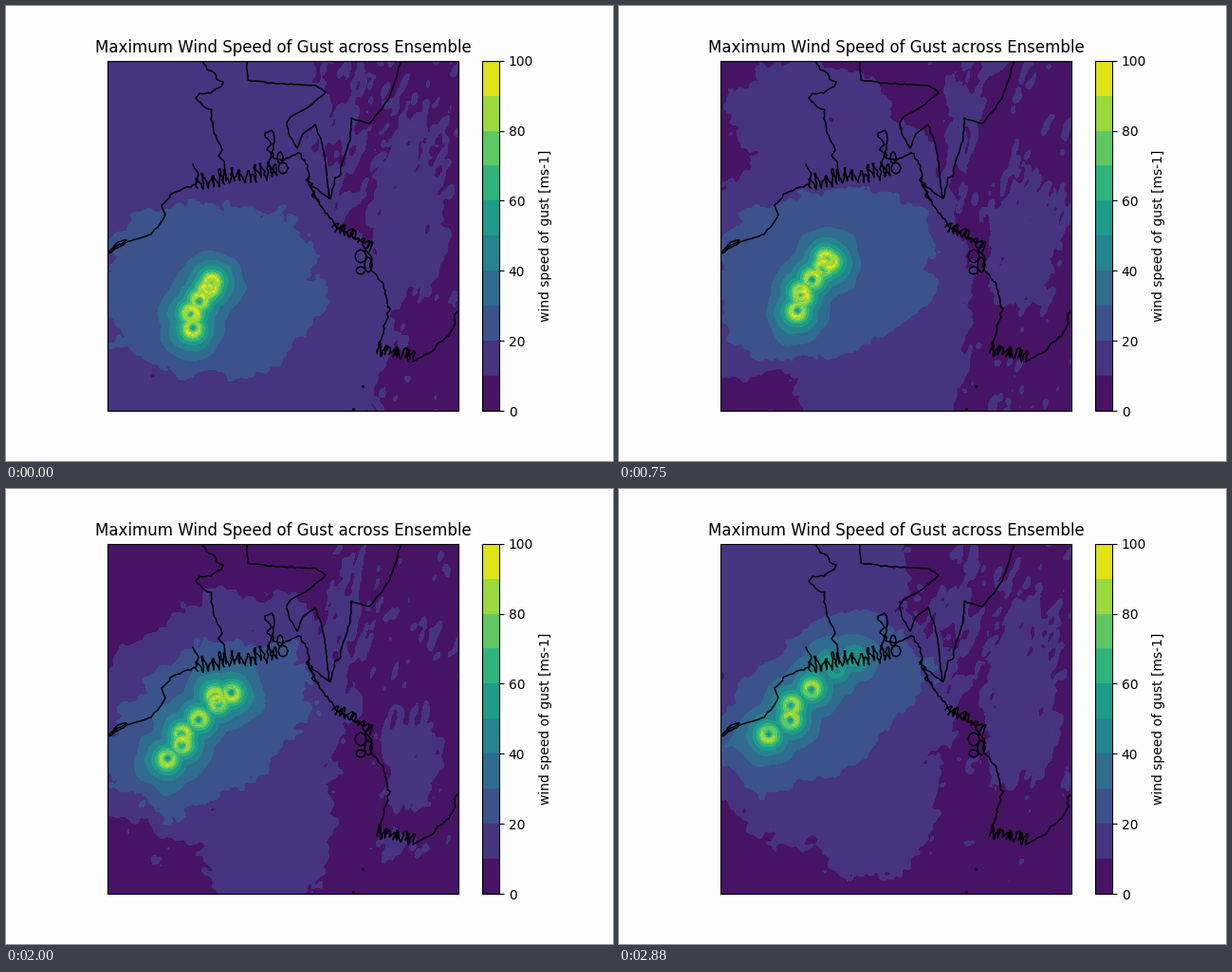
A matplotlib script for the animation above (3.01 s loop, 640 by 480 pixels).

```python
import numpy as np
import matplotlib.pyplot as plt
from matplotlib.animation import ArtistAnimation

STEPS = 24
LOOP_MS = 3010
LEFT, RIGHT, TOP, BOTTOM = 107.2, 476.8, 57.6, 427.2
N = 186

X, Y = np.meshgrid(np.linspace(LEFT, RIGHT, N), np.linspace(TOP, BOTTOM, N))
rng = np.random.default_rng(4)


def noise(sx, sy, tilt=0.0):
    """Smooth random field with unit spread; sizes in grid cells."""
    white = np.fft.fft2(rng.standard_normal(X.shape))
    kx, ky = np.meshgrid(np.fft.fftfreq(N), np.fft.fftfreq(N))
    u = kx * np.cos(tilt) + ky * np.sin(tilt)
    w = ky * np.cos(tilt) - kx * np.sin(tilt)
    field = np.fft.ifft2(white * np.exp(-20 * ((sx * u) ** 2 + (sy * w) ** 2))).real
    return field / field.std()


def shifting(*size):
    """Noise that changes smoothly with time."""
    a, b = noise(*size), noise(*size)
    return lambda t: a * np.cos(2 * np.pi * t) + b * np.sin(2 * np.pi * t)


fine, coarse = shifting(1.2, 1.2), shifting(4, 4)
streak = shifting(1, 3, 0.35)
ripple = noise(3, 3)

# Rugged land to the east, strongest in the north
hills = 1 / (1 + np.exp((330 - X) / 12))
hills *= 0.45 + 0.55 / (1 + np.exp((Y - 230) / 15))

# Eye of each ensemble member: start and end of its straight path
PATHS = [
    ((197, 340), (156, 255)),
    ((196, 326), (180, 240)),
    ((194, 324), (181, 224)),
    ((204, 311), (203, 207)),
    ((212, 301), (230, 186)),
    ((215, 296), (250, 172)),
    ((217, 292), (222, 180)),
]
bright_side = rng.uniform(0, 2 * np.pi, len(PATHS))


def lerp(a, b, t):
    return a + (b - a) * t


def ramp(x):
    x = np.clip(x, 0, 1)
    return x * x * (3 - 2 * x)


def blob(cx, cy, rx, ry, tilt=0):
    """Approximate depth inside a boxy ellipse, tilted up to the right."""
    a = np.radians(tilt)
    dx, dy = X - cx, Y - cy
    u = np.abs(dx * np.cos(a) - dy * np.sin(a)) / rx
    v = np.abs(dx * np.sin(a) + dy * np.cos(a)) / ry
    return (1 - (u ** 2.5 + v ** 2.5) ** 0.4) * min(rx, ry)


def breeze(t):
    """Depth inside the areas above 10 m/s."""
    mid = np.sin(np.pi * t) ** 2
    north = max(1 - 2.5 * t, (t - 0.8) / 0.2, 0.05)
    south = max(1 - abs(t - 0.78) / 0.2, 0.05)
    tail = np.exp(-7 * t)
    areas = [
        blob(220, 240, 145, 112, 35),
        blob(300 - 38 * t - 75 * tail, 335 - 20 * t, 70 + 120 * tail, 130 - 50 * t ** 6),
        blob(110, 335 - 75 * t, 130, 80 - 35 * t),
        blob(150 + 90 * np.sin(np.pi * t), 115, 190 * north, 105 * north),
        blob(425, 215 + 90 * mid, 40 - 12 * mid, 95 - 55 * mid),
        blob(412, 375, 48 * south, 24 * south),
        blob(358, 130, 16, 52, -8),
    ]
    area = np.clip(np.max(areas, axis=0), -12, 14)
    return area + 3 * fine(t) + 3.5 * coarse(t) + hills * 8 * streak(t)


def gale(t):
    """Depth inside the area above 20 m/s."""
    area = blob(lerp(218, 212, t), lerp(297, 222, t), 115, lerp(88, 68, t),
                35 * min(1, 2 * t))
    return area + 2.5 * fine(t) + 4 * coarse(t)


def vortex(x, y, peak, side, eye=6.5):
    dx, dy = X - x, Y - y
    r = np.hypot(dx, dy)
    peak = peak * (1 + 0.07 * np.cos(np.arctan2(dy, dx) - side))
    d = np.maximum(r - eye, 0)
    fall = 0.55 * np.exp(-d / 6) + 0.45 * np.exp(-d / 18)
    outer = 28 + (peak - 28) * fall - 0.006 * d ** 2 + ripple * d / 20
    return np.where(r < eye, lerp(35, peak, r / eye), outer)


def gusts(step):
    t = step / (STEPS - 1)
    layers = [np.minimum(10 + 0.3 * breeze(t), 17),
              np.minimum(20 + 0.6 * gale(t), 27)]
    for (start, end), side in zip(PATHS, bright_side):
        x, y = lerp(start[0], end[0], t), lerp(start[1], end[1], t)
        landfall = ramp((y - 185) / 30)
        layers.append(vortex(x, y, lerp(55, 91 - 5 * t, landfall), side))
    return np.clip(np.max(layers, axis=0), 0.5, 99.5)


fig, ax = plt.subplots(figsize=(6.4, 4.8), dpi=100, facecolor="#fdfdfe")
ax.set(xlim=(LEFT, RIGHT), ylim=(BOTTOM, TOP), xticks=[], yticks=[], aspect="equal")
ax.set_title("Maximum Wind Speed of Gust across Ensemble")
ax.set_facecolor(plt.get_cmap("viridis")(0.05))


def trace(pts, rough=0.6):
    """Draw a line through the points with small random wiggles."""
    pts = np.array(pts, float)
    out = [pts[:1]]
    for a, b in zip(pts, pts[1:]):
        n = max(1, int(np.hypot(*(b - a)) / 3))
        t = np.arange(1, n + 1)[:, None] / n
        out.append(lerp(a, b, t) + rng.normal(0, rough, (n, 2)) * (t < 1))
    x, y = np.concatenate(out).T
    ax.plot(x, y, color="black", lw=1.1)


def fjords(start, end, count, reach):
    """Draw a shore cut by inlets of random length."""
    start, end = np.array(start, float), np.array(end, float)
    along = (end - start) / count
    unit = along / np.hypot(*along)
    inland = np.array([unit[1], -unit[0]])
    pts = [start]
    for i in range(count):
        tip = inland * reach * rng.uniform(0.35, 1) + unit * rng.normal(0, 2)
        foot = start + along * (i + 0.4)
        pts += [foot + tip, foot + tip + unit * 1.5, start + along * (i + 1)]
        pts[-1] = pts[-1] - inland * rng.uniform(-2, 3)
    trace(pts, 0.7)


def island(x, y, rx, ry):
    a = np.linspace(0, 2 * np.pi, 9)
    trace(np.column_stack([x + rx * np.cos(a), y + ry * np.sin(a)]), 0.6)


# Borders
trace([(207, 58), (212, 67), (220, 71), (222, 77), (229, 80), (227, 85), (216, 92),
       (204, 92), (200, 97), (210, 107), (217, 109), (216, 119), (222, 140),
       (228, 152), (224, 158), (230, 164), (232, 184)])
trace([(254, 58), (255, 78), (285, 82), (327, 84), (337, 91), (318, 107), (300, 117),
       (296, 123), (299, 137), (307, 150), (313, 135), (326, 125), (332, 140),
       (337, 165), (341, 203), (323, 190)], 0.4)
trace([(416, 58), (412, 75), (404, 97), (392, 113), (383, 124), (364, 118),
       (363, 140), (353, 170), (353, 178), (347, 181), (342, 203)], 0.4)

# Western coast and lagoon
trace([(108, 261), (126, 250), (153, 241), (163, 229), (168, 220), (164, 210),
       (177, 197), (200, 188), (203, 178), (197, 167)], 0.4)
trace([(108, 260), (118, 249), (127, 247), (113, 256)], 0.4)

# River delta and estuary
fjords((202, 192), (286, 180), 15, 17)
trace([(285, 178), (277, 164), (280, 156), (275, 152), (280, 146), (276, 140),
       (273, 134), (280, 131), (283, 140), (281, 160), (292, 163), (308, 155)], 0.9)
island(292, 171, 5, 6)
island(289, 160, 3, 6)

# Eastern coast with its islands
trace([(308, 155), (318, 168), (319, 185), (328, 205), (348, 233), (376, 250),
       (386, 268), (384, 275), (398, 295), (404, 322), (399, 340), (391, 364)], 0.8)
fjords((344, 233), (384, 258), 9, 10)
fjords((320, 180), (328, 205), 3, -5)
island(374, 264, 6, 7)
island(374, 279, 5, 4)
island(382, 273, 4, 8)

# Southern delta
fjords((391, 366), (429, 374), 9, 13)
trace([(429, 375), (450, 364), (455, 356), (467, 348), (474, 335), (473, 325),
       (477, 322)], 0.7)
ax.plot([375.5, 365.5], [401, 424.5], "k.", ms=2.5)

levels = np.arange(0, 101, 10)
frames = [[ax.contourf(X, Y, gusts(step), levels, cmap="viridis", vmin=0, vmax=100)]
          for step in range(STEPS)]
fig.colorbar(frames[0][0], ax=ax, ticks=levels[::2], label="wind speed of gust [ms-1]")

anim = ArtistAnimation(fig, frames, interval=LOOP_MS / STEPS, repeat=True, repeat_delay=0)
plt.show()
```
